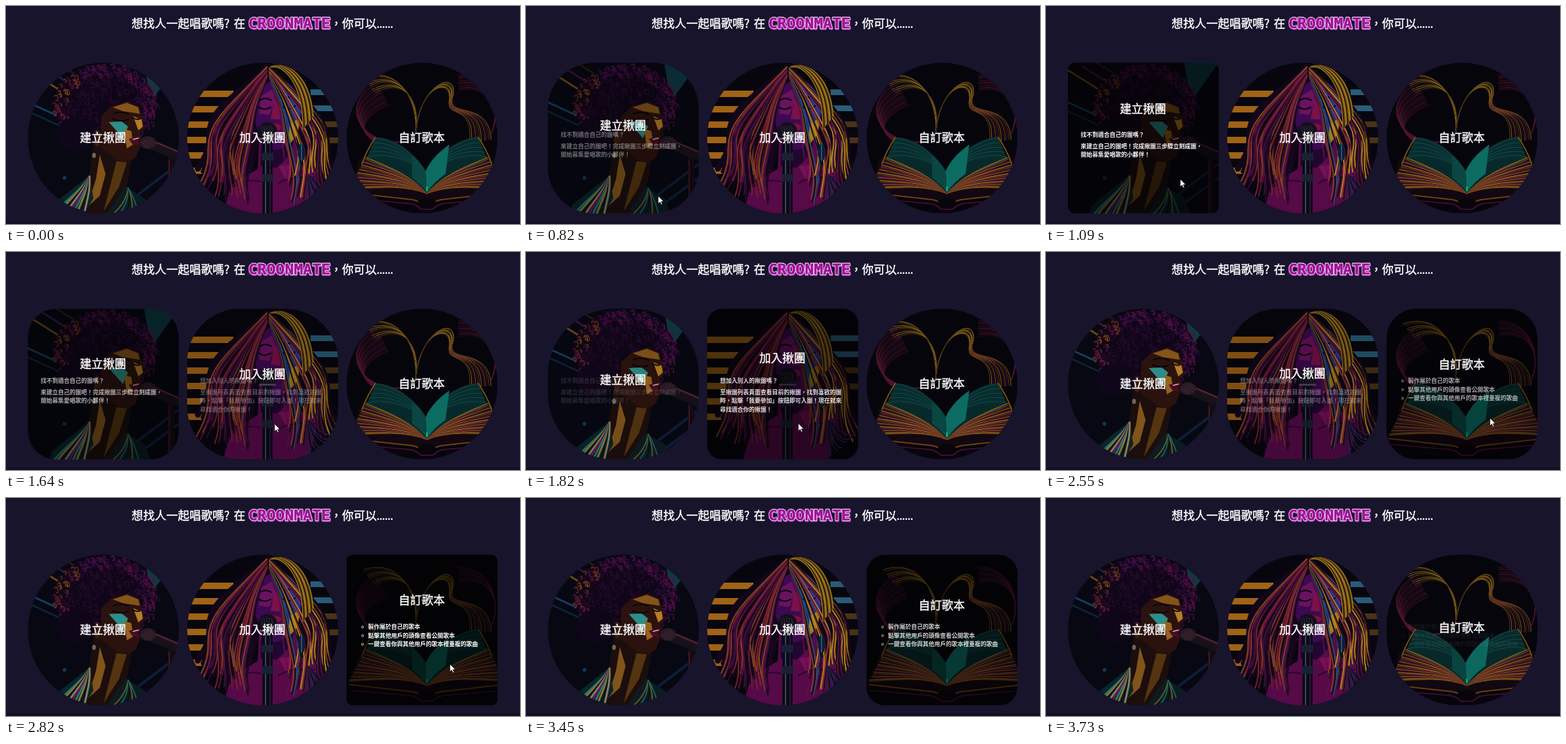
Animation of 800x340 px, one loop 3.82 s. Source, as an HTML page:

```html
<!DOCTYPE html>
<html lang="zh-TW">
<head>
<meta charset="utf-8">
<style>
html, body { margin: 0; width: 100%; height: 100%; overflow: hidden; background: #18142c; }
svg { display: block; width: 800px; height: 340px; }
text { font-family: "Noto Sans CJK TC", "Noto Sans CJK JP", "Noto Sans CJK", sans-serif; fill: #fff; }
.head, .title { font-size: 18px; font-weight: 500; stroke: #fff; stroke-width: .4; }
.dots { font-family: Lato, sans-serif; }
.brand { font: bold 23.6px "DejaVu Sans Mono", monospace; stroke-linejoin: round; }
.title { text-anchor: middle; }
.body text { font-size: 9px; font-weight: 700; }
</style>
</head>
<body>
<svg id="stage" viewBox="0 0 800 340"></svg>
<script>
const LOOP = 3820, FPS = 11, FADE = 500, SIZE = 235, TOP = 88.5;
const GOLD = ['#a58118', '#684610', '#1d1010', '#98731a'];
const WARM = ['#94741a', '#70400f', '#640e42', '#865914', '#3f0a34'];
const PINK = ['#5e0e45', '#642a18', '#3f0b3c'];
const TEAL = ['#155c57', '#0b3635'];

// Drawing helpers
let seed = 7;
const random = () => (seed = seed * 16807 % 2147483647) / 2147483647;
const pick = list => list[Math.floor(random() * list.length)];
const repeat = (n, make) => Array.from({ length: n }, (_, i) => make(i)).join('');
const shape = (d, fill) => `<path d="${d}" fill="${fill}"/>`;
const blob = (x, y, rx, ry, fill) => `<ellipse cx="${x}" cy="${y}" rx="${rx}" ry="${ry}" fill="${fill}"/>`;
const bar = (x, y, w, h, fill) => `<rect x="${x}" y="${y}" width="${w}" height="${h}" fill="${fill}"/>`;
const line = (d, color, width = 1) =>
  `<path d="${d}" fill="none" stroke="${color}" stroke-width="${width}" stroke-linecap="round"/>`;

// Cubic strands that leave one point and spread by (dx, dy) at the far end
const fan = (curve, dx, dy, n, colors, width = 1) => repeat(n, i => {
  const c = curve.map((v, j) => (v + (j % 2 ? dy : dx) * (j >> 1) / 3 * i / (n - 1)).toFixed(1));
  return line(`M${c[0]} ${c[1]}C${c.slice(2).join(' ')}`, colors[i % colors.length], width);
});
const mirrored = (axis, markup) => markup + `<g transform="matrix(-1 0 0 1 ${2 * axis} 0)">${markup}</g>`;

// Dense curls in a disc: warm rim on the left, violet rim on the right
function afro(cx, cy, rx, ry) {
  return blob(cx, cy, rx - 3, ry - 3, '#10061a') + repeat(620, () => {
    const a = random() * 2 * Math.PI, r = Math.sqrt(random());
    const x = cx + rx * r * Math.cos(a), y = cy + ry * r * Math.sin(a), s = 2 + random() * 2.5;
    const color = r < .72 ? pick(['#1c0822', '#0c0512', '#2a0c30'])
      : Math.cos(a) < -.6 ? pick(['#70420f', '#64153f', '#2a0b22'])
      : pick(['#4c0e48', '#5e123e', '#2c0c3c']);
    return line(`M${x.toFixed(1)} ${y.toFixed(1)}q${s} ${-s} ${s * 1.3} ${s * .4}t${-s * .5} ${s}`, color, 1.2);
  });
}

function singerArt() {
  return bar(34, 88, SIZE, SIZE, '#070812')
    + shape('M215 88H269L225 150Z', '#0d3a42')
    + repeat(3, i => line(`M${34 + i * 22} ${100 - i * 6}l70 44`, ['#6a4a12', '#3c1440', '#2a1a10'][i], 3))
    + repeat(2, i => line(`M34 ${150 + i * 14}l50 23`, ['#124060', '#0b2438'][i], 3)
      + line(`M${190 + i * 14} ${306 + i * 10}L269 ${246 + i * 22}`, '#0e1e3c', 4))
    + blob(91, 268, 3, 3, '#123558')
    + afro(153, 153, 82, 63) + blob(108, 200, 30, 26, '#10061a')
    + shape('M138 205L196 238L188 282L207 323H104L128 272Z', '#1c0e0d')
    + shape('M146 232L155 262L146 296L126 314L140 270Z', '#80541a')
    + shape('M172 242L188 244L176 282L152 320Z', '#54350f')
    + shape('M148 172L164 157L188 149L207 157L212 172L216 190L209 198L212 204L204 211L209 219L202 236Q190 247 173 240L148 220Z', '#2c120f')
    + shape('M166 158L188 151L206 158L208 168L182 164Z', '#84551a')
    + shape('M198 172L211 177L213 188L206 194Z', '#b47d24')
    + shape('M160 181L180 180L190 188L182 206Z', '#2d8d88')
    + shape('M184 192L195 195L198 216L188 222Z', '#98621c')
    + line('M166 176Q179 182 190 177M167 168Q180 163 191 169M197 174Q203 178 208 176', '#0b0507', 2)
    + shape('M191 207L212 203L206 211L209 217L197 216Z', '#4a0b22') + line('M198 208L206 206', '#c8c0b0', 1.6)
    + blob(142, 206, 5, 13, '#3c200f') + blob(137, 233, 3, 4, '#6c6658')
    + shape('M72 310L130 264L136 300L122 323H68Z', '#0b2428')
    + fan([130, 266, 116, 288, 96, 300, 76, 323], 46, 0, 9, ['#1d777a', '#8a742c', '#0b1417', '#8a7c62', '#6b1550'], 3)
    + shape('M186 282L216 300L224 323H158Z', '#0c1c22')
    + fan([190, 284, 188, 300, 178, 314, 168, 323], 38, 0, 5, ['#6a5a1e', '#155f64', '#081014'], 2)
    + bar(252, 232, 10, 91, '#160b14') + line('M254 240V323', '#4c1c2a', 1.5)
    + shape('M222 206L269 225V242L221 222Z', '#17121a') + line('M232 212L269 228', '#642336', 2)
    + blob(221, 213, 13, 10, '#2a1a24')
    + repeat(4, i => line(`M${211 + i * 4} ${212 - i * 2}l9 9`, '#563440', .8));
}

// Wavy hair falling from a parting; k runs from the face outwards
function hair(cx, side, n, colors, width) {
  return repeat(n, i => {
    const k = i / (n - 1), length = 155 + 45 * random();
    const points = Array.from({ length: 16 }, (_, j) => {
      const u = j / 15;
      const spread = (25 + 58 * k) * Math.sin(Math.min(1, 1.5 * u) * Math.PI / 2);
      const x = cx + side * (spread + 24 * k * u * u + 6 * u * Math.sin(9 * u + 4 * k));
      return `${x.toFixed(1)} ${(95 + 16 * (1 - k) + length * u).toFixed(1)}`;
    });
    return line('M' + points.join('L'), pick(colors), width);
  });
}

function duetArt() {
  const dark = ['#12061a'];
  const red = ['#64103f', '#7e2428', '#16061a', '#82481a', '#430f42', '#1e0824', '#300b30'];
  const blonde = ['#b48d17', '#7a5a12', '#1d1010', '#8a3a2a', '#5a1048', '#205260', '#12081a'];
  return bar(282, 88, SIZE, SIZE, '#07060e')
    + repeat(6, i => bar(282, 132 + 24 * i, 72, 10, '#a06216'))
    + repeat(4, i => bar(474, 130 + 25 * i, 43, 9, i < 2 ? '#285c78' : '#4a3218'))
    + hair(408, -1, 24, dark, 9) + hair(408, 1, 24, dark, 9)
    + shape('M394 205L452 200L456 246L486 260L472 323H338L350 280L392 254Z', '#560a48')
    + shape('M397 214L448 212L440 234L422 252L396 250Z', '#210630')
    + shape('M424 250L452 246L474 262L436 270Z', '#7a0f58')
    + line('M350 282Q380 268 396 274M424 276Q446 264 480 268', '#28062a', 2)
    + shape('M391 142C400 116 424 108 441 122C460 137 464 168 455 192C448 210 432 224 418 225C400 218 389 196 387 170Z', '#3c0a50')
    + shape('M426 116C458 122 465 168 452 194L434 219L438 184L427 160Z', '#22358c')
    + shape('M442 184L458 174L454 200L438 219Z', '#a07c19')
    + shape('M397 140L414 130L419 146L410 170L394 168Z', '#6a125f')
    + shape('M418 144L428 160L426 177L412 176Z', '#7c1149')
    + line('M394 158Q402 164 412 158M430 157Q440 164 450 156M394 148Q403 141 413 147M430 145Q441 139 451 146', '#08050e', 2.2)
    + blob(416, 189, 12, 6, '#84113a')
    + hair(406, -1, 34, red, 1.9) + hair(410, 1, 30, blonde, 1.9)
    + fan([412, 95, 440, 84, 474, 112, 478, 172], -16, 20, 12, GOLD, 1.6)
    + fan([470, 262, 480, 270, 494, 290, 512, 284], -40, 38, 10, ['#3c1248', '#100a1c', '#1c2a46'], 2)
    + blob(460, 228, 6, 14, '#101d38') + line('M460 213V240', '#386079', 1.5)
    + bar(399, 207, 16, 116, '#0b0b16') + line('M404 211V323', '#46566c', 1.6) + line('M411 211V323', '#311443', 2)
    + repeat(2, i => bar(398, 229 + 33 * i, 18, 12, '#1b2034'))
    + blob(407, 195, 15, 14, '#12101c')
    + repeat(5, i => line(`M${397 + i * 4} 187l4 17`, '#43364c', .8)) + line('M395 207H419', '#5a4c5e', 3);
}

function bookArt() {
  const spine = 655;
  const half = shape('M550 238L655 284V306L538 290Z', '#120812')
    + shape('M575 205C602 204 638 228 654 258L655 291C622 264 588 256 560 240Z', '#08292b')
    + fan([653, 260, 638, 232, 602, 207, 576, 206], -15, 33, 10, TEAL, .8)
    + fan([654, 292, 628, 262, 592, 250, 560, 236], -26, 50, 22, WARM, 1.3)
    + line('M575 205Q562 224 554 246', '#795311', 2)
    + line('M534 291L632 302Q644 304 648 311H655', '#70400f', 2)
    + line('M536 300L628 308Q640 310 646 317H655', '#550d3f', 1.4);
  return bar(530, 88, SIZE, SIZE, '#06050c')
    + fan([638, 196, 640, 140, 608, 94, 556, 112], 20, 26, 11, GOLD, .9)
    + fan([612, 212, 560, 215, 512, 160, 575, 118], 20, 36, 16, PINK, .8)
    + fan([638, 196, 644, 120, 704, 98, 696, 140], -8, 14, 11, GOLD, .9)
    + fan([695, 142, 684, 176, 752, 145, 755, 208], -34, 4, 12, WARM, .9)
    + fan([755, 200, 775, 150, 745, 105, 704, 108], 2, 24, 9, PINK, .8)
    + mirrored(spine, half)
    + shape('M653 258Q662 236 690 216L684 262Q666 274 655 291Z', '#0c6c62')
    + shape('M632 234Q646 244 653 258L655 291Q644 276 632 268Z', '#0a4642')
    + blob(spine, 307, 14, 8, '#08050a') + line('M655 282V288', '#14b878', 2);
}

const CARDS = [
  { x: 34, on: 690, off: 1530, title: '建立揪團', art: singerArt,
    lines: ['找不到適合自己的團嗎？', '來建立自己的團吧！完成揪團三步驟立刻成團，', '開始募集愛唱歌的小夥伴！'] },
  { x: 282, on: 1530, off: 2355, title: '加入揪團', art: duetArt,
    lines: ['想加入別人的揪團嗎？', '至揪團列表頁面查看目前的揪團，找到喜歡的團', '時，點擊「我要參加」按鈕即可入團！現在就來', '尋找適合你的揪團！'] },
  { x: 530, on: 2355, off: 3380, title: '自訂歌本', art: bookArt, list: true,
    lines: ['製作屬於自己的歌本', '點擊其他用戶的頭像查看公開歌本', '一鍵查看你與其他用戶的歌本裡重複的歌曲'] }
];

const POINTER = { x: 204, y: 310, show: 720, hide: 3400 };
const MOVES = [
  { at: 700, span: 300, x: 209, y: 270 },
  { at: 1350, span: 225, x: 418, y: 268 },
  { at: 1640, span: 270, x: 426, y: 267 },
  { at: 2175, span: 225, x: 691, y: 259 },
  { at: 3230, span: 170, x: 696, y: 330 }
];

const bodyText = card => card.lines.map((s, i) => {
  const y = 204.4 + i * 13.5 + (i && !card.list ? 3.8 : 0);
  const bullet = card.list ? `<circle cx="555" cy="${y - 3.2}" r="1.6" fill="none" stroke="#fff" stroke-width=".8"/>` : '';
  return `${bullet}<text x="${card.x + (card.list ? 33.5 : 20)}" y="${y}">${s}</text>`;
}).join('');

const cardMarkup = (card, i) => `
  <clipPath id="clip${i}"><rect id="frame${i}" x="${card.x}" y="${TOP}" width="${SIZE}" height="${SIZE}"/></clipPath>
  <g clip-path="url(#clip${i})">${card.art()}
    <rect id="shade${i}" x="${card.x}" y="${TOP}" width="${SIZE}" height="${SIZE}"/></g>
  <g id="body${i}" class="body">${bodyText(card)}</g>
  <text id="title${i}" class="title" x="${card.x + SIZE / 2 - .5}">${card.title}</text>`;

const brand = (shift, color, width, edge = color) =>
  `<text class="brand" x="${377 + shift}" y="${35 + shift}" style="fill:${color};stroke:${edge};stroke-width:${width}">CROONMATE</text>`;

document.getElementById('stage').innerHTML = `
  <rect width="800" height="340" fill="#18142c"/><rect y="336" width="800" height="4" fill="#130f24"/>
  <text class="head" x="195.5" y="34">想找人一起唱歌嗎?</text><text class="head" x="354.5" y="34">在</text>
  ${brand(1, '#8d1a98', 3)}${brand(0, '#fff', 2.4)}${brand(0, '#a1109a', .7)}
  <text class="head" x="505" y="34">，你可以<tspan class="dots">......</tspan></text>
  ${CARDS.map(cardMarkup).join('')}
  <path id="pointer" d="M0 0V12L2.8 9.4L4.6 13.5L6.5 12.7L4.7 8.7H8.5Z" fill="#fff" stroke="#000" stroke-width=".7"/>`;

const set = (id, name, value) => document.getElementById(id).setAttribute(name, value);
const clamp = v => Math.min(1, Math.max(0, v));
const smooth = v => clamp(v) ** 2 * (3 - 2 * clamp(v));

// The CSS "ease" curve: cubic-bezier(.25, .1, .25, 1)
function ease(t) {
  if (t <= 0 || t >= 1) return clamp(t);
  const curve = (s, a, b) => 3 * a * s * (1 - s) ** 2 + 3 * b * s * s * (1 - s) + s ** 3;
  let lo = 0, hi = 1;
  for (let i = 0; i < 20; i++) {
    const mid = (lo + hi) / 2;
    if (curve(mid, .25, .25) < t) lo = mid; else hi = mid;
  }
  return curve(lo, .1, 1);
}

function draw(time) {
  // The picture advances in whole steps, rounded to 10 ms
  const t = Math.floor((time + 5) * FPS / 1000) * 1000 / FPS;
  CARDS.forEach((card, i) => {
    const open = ease((t - card.on) / FADE) - ease((t - card.off) / FADE);
    set('frame' + i, 'rx', SIZE / 2 - (SIZE / 2 - 9) * open);
    set('shade' + i, 'opacity', .58 * open);
    set('body' + i, 'opacity', open);
    set('title' + i, 'y', 212 - 46 * open);
  });
  let { x, y } = POINTER;
  for (const move of MOVES) {
    const k = smooth((t - move.at) / move.span);
    x += (move.x - x) * k;
    y += (move.y - y) * k;
  }
  set('pointer', 'transform', `translate(${x} ${y})`);
  set('pointer', 'visibility', t > POINTER.show && t < POINTER.hide ? 'visible' : 'hidden');
}

const start = performance.now();
function tick() {
  draw((performance.now() - start) % LOOP);
  requestAnimationFrame(tick);
}
tick();
</script>
</body>
</html>
```
